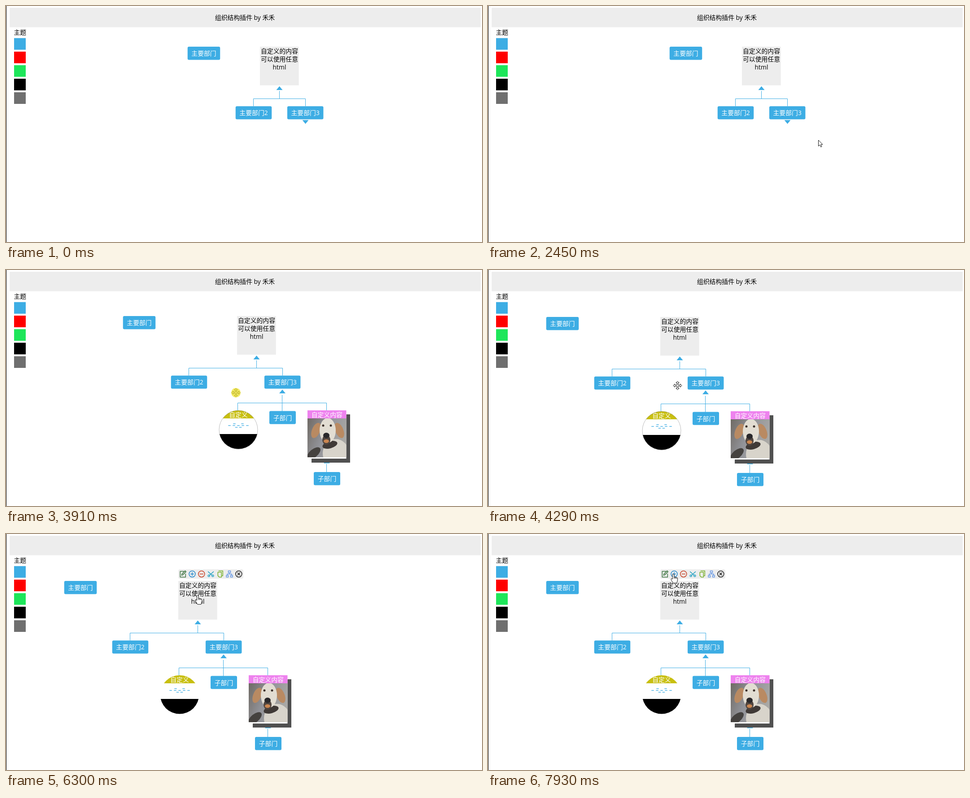
Recreate the animation shown at these times as an HTML page. Size 1061 px wide and 528 px high, loop 8000 ms.

```html
<!DOCTYPE html>
<html lang="zh">
<head>
<meta charset="utf-8">
<title>组织结构</title>
<style>
html, body { margin: 0; width: 100%; height: 100%; overflow: hidden; background: #fff; }
svg { display: block; width: 100vw; height: 100vh; }
text { font: 13.87px "Open Sans", "Noto Sans CJK SC", "Noto Sans CJK", sans-serif; text-anchor: middle; }
.line { fill: none; stroke: #3dade4; stroke-width: 1; }
.light { fill: #fff; }
.icon { fill: none; stroke-width: 1.5; stroke-linecap: round; stroke-linejoin: round; }
.pointer { fill: #fff; stroke: #111; stroke-width: 1; stroke-linejoin: round; }
</style>
</head>
<body>
<svg id="stage" viewBox="0 0 1061 528"></svg>
<script>
const BLUE = '#3dade4';
const rect = (x, y, w, h, fill, r = 0) =>
  `<rect x="${x}" y="${y}" width="${w}" height="${h}" rx="${r}" fill="${fill}"/>`;
const oval = (x, y, rx, ry, fill, turn = 0) =>
  `<ellipse rx="${rx}" ry="${ry}" fill="${fill}" transform="translate(${x} ${y}) rotate(${turn})"/>`;
const label = (x, y, s, cls = '') => `<text x="${x}" y="${y}" class="${cls}">${s}</text>`;
const line = d => `<path d="${d}" class="line"/>`;
const node = (cx, y, w, s) =>
  rect(cx - w / 2, y, w, 29.4, BLUE, 3) + label(cx, y + 20.2, s, 'light');
const triangle = (x, y, h) => `<path d="M${x - 7} ${y}h14l-7 ${h}z" fill="${BLUE}"/>`;

function roundCard() {
  const dash = (x, y) => rect(566 + x, y, 6, 2, '#7cc7ec', 1);
  let dashes = '';
  for (let x = -20; x <= 20; x += 10) dashes += dash(x, 335);
  for (const side of [-1, 1]) dashes += dash(side * 9, 331) + dash(side * 4.5, 339);
  return `<clipPath id="disc"><circle cx="569" cy="345.3" r="43.3"/></clipPath>
    <g clip-path="url(#disc)">${rect(525, 301, 88, 19, '#c8bf10')}${rect(525, 320, 88, 35, '#fff')}
    ${rect(525, 355, 88, 35, '#000')}</g>
    <circle id="ring" cx="569" cy="345.3" r="43" fill="none" stroke="#777" stroke-width=".5"/>
    ${dashes}${label(569, 317.2, '自定义', 'light')}`;
}

// Flat picture of a pale dog.
function picture() {
  const both = draw => [-1, 1].map(draw).join('');
  return `<clipPath id="frame"><rect width="86.5" height="87"/></clipPath>
    <linearGradient id="yard" x2="1" y2=".4"><stop stop-color="#6f6a64"/><stop offset=".5" stop-color="#929399"/>
    <stop offset="1" stop-color="#a9a8a5"/></linearGradient>
    <g transform="translate(723 320)" clip-path="url(#frame)">
    ${rect(0, 0, 87, 87, 'url(#yard)')}
    ${oval(14, 78, 18, 9, '#45423f', -40)}${oval(63, 78, 29, 32, '#d8d4cb')}
    ${oval(50, 59, 17, 8, '#403a37', -15)}
    ${both(s => oval(45 + s * 26, 27, 9, 18, '#b98a62', -s * 22))}
    ${oval(45, 27, 18, 28, '#e2ddd2')}${oval(42, 48, 9, 11, '#514640')}
    ${oval(42, 51, 6, 4, '#cb8650')}${oval(42, 38, 7, 6, '#29282a')}
    ${both(s => oval(43.5 + s * 8.5, 16, 2.5, 2.5, '#3b302a'))}</g>`;
}

function toolbar() {
  const ring = '<circle r="7"/>';
  const icons = [
    ['#3d7440', '<path d="M2 -6H-6V7H6V0M-3 3L-2 0L5 -7L7 -5L0 2Z"/>'],
    ['#2488cc', ring + '<path d="M-3.5 0H3.5M0 -3.5V3.5"/>'],
    ['#c83f22', ring + '<path d="M-3.5 0H3.5"/>'],
    ['#27a2c3', '<path d="M-6 -5L3 3M6 -5L-3 3"/><circle cx="-4.3" cy="4" r="2"/><circle cx="4.3" cy="4" r="2"/>'],
    ['#78b02b', '<path d="M-3 -7H6V4H3M-5 -4H3V7H-2L-5 4Z"/>'],
    ['#6b9be6', '<path d="M-2.5 -7h5v4h-5zM0 -3V0M-5 3V0H5V3M-7 3h4.5v4h-4.5zM2.5 3h4.5v4h-4.5z"/>'],
    ['#222', ring + '<path d="M-2.5 -2.5l5 5m0 -5l-5 5"/>']
  ];
  return rect(566, 65, 145, 21, '#ededed', 4) + icons.map(([c, d], i) =>
    `<g class="icon" stroke="${c}" transform="translate(${576.3 + i * 20.75} 75.4)">${d}</g>`).join('');
}

const swatches = [BLUE, '#f00', '#1ee65a', '#000', '#6f6f6f']
  .map((c, i) => rect(18, 71.8 + i * 30.3, 26, 26, c)).join('');

const arrow = '<path class="pointer" d="M.5 .5V14L3.6 11.2L5.8 16L8 15L5.9 10.4H10Z"/>';
const hand = '<path class="pointer" d="M-1.8 12V2Q0 -1.5 1.8 2V7L7 8.4Q9.7 8.5 9.7 11V14L7.7 20.8H-.3L-5 13Q-5 9 -1.8 12ZM1.8 7v4M4.4 7.5v3.5M7 8.4v2.6"/>';
const quarters = d => [0, 90, 180, 270].map(a => `<path d="${d}" transform="rotate(${a})"/>`).join('');
const mover = `<g class="pointer" stroke-width=".8">${quarters('M-1.3 -1.3V-6H-3.5L0 -9.7L3.5 -6H1.3V-1.3')}</g>`;

const stage = document.getElementById('stage');
stage.innerHTML = `
  ${rect(0, 0, 1, 528, '#000')}${rect(8, 4, 1050, 43.5, '#ededed')}
  ${label(532.5, 31.2, '组织结构插件 by 禾禾')}${label(31.3, 64.2, '主题')}${swatches}
  <g id="chart">
    <g id="main">${node(441, 91, 72.5, '主要部门')}</g>
    ${rect(566, 91, 86.7, 86.5, '#ededed')}
    ${['自定义的内容', '可以使用任意', 'html'].map((s, i) => label(609.5, 106 + i * 18, s)).join('')}
    ${triangle(609.5, 188, -8.5)}${line('M609.5 190V207.5')}
    <path id="branch" class="line"/>
    <g id="second">${node(552, 224.2, 80.5, '主要部门2')}</g>
    ${node(667.2, 224.2, 80.5, '主要部门3')}
    <g id="closed">${triangle(667.5, 255.3, 8.5)}</g>
    <g id="open">
      ${triangle(667, 264, -8.5)}${line('M666.5 267.5V304M567.5 303V285.5H765.5V303')}
      ${roundCard()}${node(667.5, 303.4, 59, '子部门')}
      ${triangle(766, 420.5, -8.5)}${line('M765.5 422V440')}
      ${rect(732, 311, 86, 108, '#505050')}${rect(723, 302, 86.5, 108, '#fff')}
      ${rect(723, 302, 86.5, 18, '#ee82ee')}${picture()}
      ${label(766.3, 317.2, '自定义内容', 'light')}
      ${node(766.5, 440, 59, '子部门')}
    </g>
    <g id="tools">${toolbar()}</g>
    <g id="cursor"><g id="arrow">${arrow}</g><g id="hand">${hand}</g><g id="mover">${mover}</g>
      <circle id="press" r="10.5" fill="#efe324" opacity=".7"/></g>
  </g>`;

const $ = id => document.getElementById(id);
const show = (id, on) => $(id).setAttribute('display', on ? 'inline' : 'none');
const move = (id, x, y) => $(id).setAttribute('transform', `translate(${x} ${y})`);
const within = (t, a, b) => t >= a && t < b;

// Runs through moves of the form { from, to, x, y }, easing each one.
function glide(x, y, moves, t) {
  for (const m of moves) {
    const p = Math.min(1, Math.max(0, (t - m.from) / (m.to - m.from)));
    const ease = p * p * (3 - 2 * p);
    x += (m.x - x) * ease;
    y += (m.y - y) * ease;
  }
  return [x, y];
}

const drag = [
  { from: 3580, to: 3910, x: -51, y: 12 },
  { from: 3910, to: 4180, x: -182, y: 14 }
];
// Pointer places are relative to the chart, so dragging carries it along.
const pointer = [
  { from: 120, to: 880, x: 694.5, y: 314.5 },
  { from: 2040, to: 2450, x: 736, y: 299.5 },
  { from: 2500, to: 2780, x: 667, y: 259 },
  { from: 2860, to: 3240, x: 563.5, y: 262.5 },
  { from: 4180, to: 4290, x: 604.5, y: 244.5 },
  { from: 4430, to: 4710, x: 622, y: 148 },
  { from: 4860, to: 5600, x: 624, y: 145.5 },
  { from: 6020, to: 6760, x: 578, y: 74.5 },
  { from: 7140, to: 7930, x: 595, y: 75 }
];

function draw(t) {
  const open = t >= 2845, selected = t >= 5740;
  const shift = open ? -93 : 0;
  move('chart', ...glide(0, 0, drag, t).map(Math.round));
  move('main', shift, 0);
  move('second', shift, 0);
  $('branch').setAttribute('d', `M${551.5 + shift} 224V207.5H667.5V224`);
  show('closed', !open);
  show('open', open);
  show('ring', !selected);
  show('tools', selected);

  const kind = within(t, 2720, 2900) || t >= 4640 ? 'hand' : open ? 'mover' : 'arrow';
  for (const id of ['arrow', 'hand', 'mover']) show(id, id === kind);
  show('cursor', t >= 120);
  show('press', within(t, 880, 970) || within(t, 2790, 2860) || within(t, 3580, 4180) || within(t, 5690, 5790));
  move('cursor', ...glide(960, 518, pointer, t));
}

const start = performance.now();
function tick() {
  draw((performance.now() - start) % 8000);
  requestAnimationFrame(tick);
}
tick();
</script>
</body>
</html>
```
